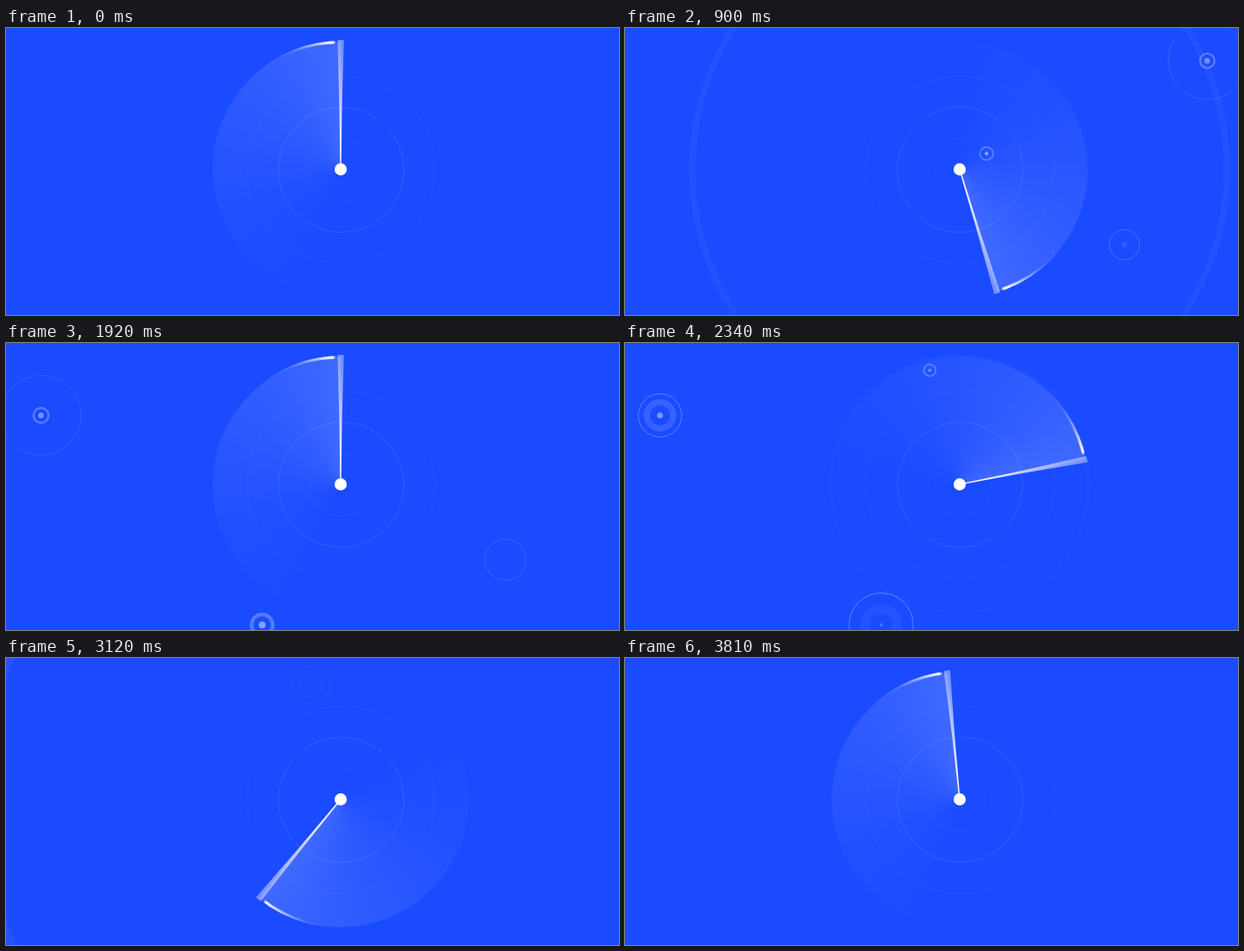
An HTML page with a canvas for the animation above (3840 ms loop, 718x337 px).

```html
<!DOCTYPE html>
<html lang="en">
<head>
<meta charset="utf-8">
<title>Radar</title>
<style>
  html, body { margin: 0; width: 100%; height: 100%; overflow: hidden; background: #1a4bff; }
  canvas { display: block; }
</style>
</head>
<body>
<canvas id="stage" width="718" height="337"></canvas>
<script>
const ctx = document.getElementById('stage').getContext('2d');
const TAU = Math.PI * 2, LOOP = 3840, TURN = 1920, STEP = 30;
const CX = 392, CY = 166, RADIUS = 150;
const white = a => `rgba(255,255,255,${a})`;
const swell = p => Math.sin(Math.PI * p);

function ring(x, y, r, alpha, width = 1) {
  ctx.beginPath();
  ctx.arc(x, y, r, 0, TAU);
  ctx.lineWidth = width;
  ctx.strokeStyle = white(alpha);
  ctx.stroke();
}

function disc(x, y, r, fill) {
  ctx.beginPath();
  ctx.arc(x, y, r, 0, TAU);
  ctx.fillStyle = fill;
  ctx.fill();
}

// Calls paint with progress 0..1 while the age lies within the given span.
function during(age, start, life, paint) {
  const p = (age - start) / life;
  if (p > 0 && p < 1) paint(p);
}

const ripple = (x, y, size, peak) => p => ring(x, y, size * p ** .8, peak * swell(p));
const dot = (x, y, size) => p => disc(x, y, size * swell(p), white(.48 * swell(p)));

// Two ripples around a ring that widens into a fading band.
function beacon(x, y, age, scale) {
  during(age, 0, 800, ripple(x, y, 54 * scale, .2));
  during(age, 740, 900, ripple(x, y, 54 * scale, .32));
  during(age, 300, 1400, p =>
    ring(x, y, (3 + 22 * p) * scale, 2.7 * p * (1 - p) ** 3, (1 + 20 * p * p) * scale));
  during(age, 300, 1200, dot(x, y, 4 * Math.sqrt(scale)));
}

// A slowly growing ring followed by one faint ripple.
function echo(x, y, age) {
  during(age, 0, 1150, p => ring(x, y, 5 + 9 * p, .27 * swell(Math.sqrt(p)), 2 - p));
  during(age, 450, 700, ripple(x, y, 27, .11));
  during(age, 0, 800, dot(x, y, 2.2));
}

// Conic gradient that brightens up to its leading edge, given in turns.
function trail(angle, span, peak, power, lead = 1) {
  const g = ctx.createConicGradient(angle, CX, CY);
  for (let i = 0; i <= 12; i++)
    g.addColorStop(lead - span * (1 - i / 12), white(peak * (i / 12) ** power));
  if (lead < 1) g.addColorStop(lead + .004, white(0));
  return g;
}

function drawRim(angle, width, span, peak, power) {
  ctx.beginPath();
  ctx.arc(CX, CY, RADIUS - width / 2 + .9, 0, TAU);
  ctx.lineWidth = width;
  ctx.strokeStyle = trail(angle, span, peak, power, .99);
  ctx.stroke();
}

function drawBeam(angle) {
  const length = 152, halfTip = 3.7;
  const glow = ctx.createLinearGradient(0, 0, length, 0);
  for (let i = 0; i <= 8; i++) glow.addColorStop(i / 8, white(.38 + .62 * (1 - (i / 8) ** 1.5) ** 1.5));
  ctx.save();
  ctx.translate(CX, CY);
  ctx.rotate(angle);
  ctx.beginPath();
  ctx.moveTo(0, -.6);
  ctx.quadraticCurveTo(length / 2, -1, length, -halfTip);
  ctx.lineTo(length, halfTip);
  ctx.quadraticCurveTo(length / 2, 1, 0, .6);
  ctx.fillStyle = glow;
  ctx.fill();
  ctx.restore();
}

function drawSweep(angle) {
  disc(CX, CY, RADIUS, trail(angle, .53, .165, 2));
  drawRim(angle, 1.6, .1, .6, 1.5);
  drawRim(angle, 3.2, .06, .95, 1.6);
  drawBeam(angle);
}

// The motion holds for one step twice per loop and catches up later.
function heldTime(ms) {
  const k = Math.floor(ms / STEP);
  const late = (k >= 9 && k < 45) || (k >= 84 && k < 118);
  return (late ? k - 1 : k) * STEP;
}

function draw(ms) {
  const t = heldTime(ms % LOOP), turnTime = t % TURN;
  ctx.fillStyle = '#1a4bff';
  ctx.fillRect(0, 0, 718, 337);

  const pulse = .36 * turnTime;
  ring(CX, CY, pulse, 4e-5 * turnTime, pulse / 40);
  for (let i = 1; i <= 3; i++) ring(CX + .5, CY + .5, 36.7 * i, i === 2 ? .1 : .035);

  drawSweep(t / TURN * TAU - TAU / 4);

  beacon(682, 38.5, t - 220, 1);
  beacon(300, 331, t - 1030, 1);
  beacon(41, 85, t - 1250, 1);
  beacon(585, 254.5, t - 400, .5);
  echo(423.5, 147.5, t - 530);
  echo(357, 32, t - 2090);

  disc(CX, CY, 7.2, white(1));
}

let start;
function tick(now) {
  start ??= now;
  draw(now - start);
  requestAnimationFrame(tick);
}
draw(0);
requestAnimationFrame(tick);
</script>
</body>
</html>
```
